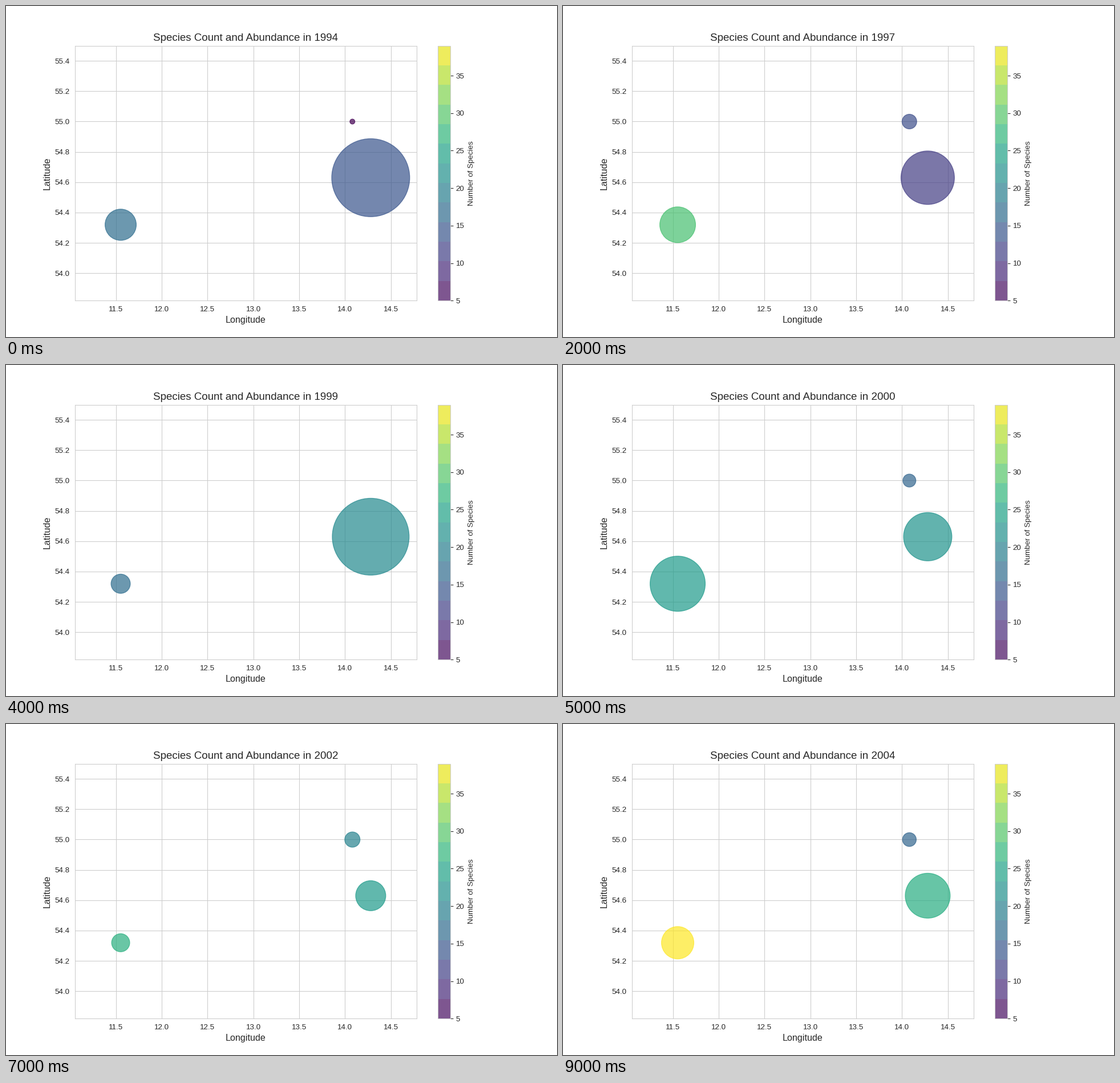
Animation of 966x580 px, one loop 10000 ms. Source, as a matplotlib script:

```python
import matplotlib.pyplot as plt
import numpy as np
from matplotlib.animation import FuncAnimation
from matplotlib.cm import ScalarMappable
from matplotlib.colors import Normalize

DPI = 96
K = 96.6 / DPI  # keeps point sizes in step with the stage width
INK, GREY = "0.15", "0.8"
ALPHA, EDGE = 0.7, 1.0 * K

plt.rcParams.update({
    "font.family": "Liberation Sans",
    "font.size": 10 * K,
    "axes.titlesize": 14 * K,
    "axes.titlepad": 6.5,
    "axes.labelsize": 12 * K,
    "axes.edgecolor": GREY,
    "axes.labelcolor": INK,
    "axes.linewidth": 0.8 * K,
    "axes.axisbelow": True,
    "text.color": INK,
    "xtick.color": INK,
    "ytick.color": INK,
})

YEARS = [1994, *range(1995, 2005)]
YEARS.remove(1996)  # no survey that year
SITES = np.array([(11.551, 54.3195), (14.081, 54.9995), (14.281, 54.6295)])

# Per site: circle radius in pixels for each year, 0 where nothing was caught
RADII = np.array([
    [28, 11, 32, 32, 17.5, 49, 32, 16.5, 17.5, 29],
    [5, 4.6, 13.5, 12, 0, 12, 11.5, 14, 17, 12.7],
    [69, 75, 47.5, 58, 68, 43, 29.7, 27, 45.5, 40],
])

# Species counts at key years; the years between are interpolated
KEYS = [1994, 1995, 1997, 1999, 2001, 2003, 2004]
COUNTS = np.array([np.interp(YEARS, KEYS, row) for row in (
    [17, 11, 29, 17, 30, 23, 39],
    [5, 5, 13, 15, 17, 23, 16],
    [14, 22, 11, 21, 24, 23, 26],
)])

fig, ax = plt.subplots(figsize=(966 / DPI, 580 / DPI), dpi=DPI)
norm = Normalize(5, 39)
bands = np.linspace(5, 39, 14)
bar = fig.colorbar(ScalarMappable(norm, "viridis"), ax=ax, alpha=ALPHA,
                   boundaries=bands, values=(bands[:-1] + bands[1:]) / 2,
                   spacing="proportional", ticks=range(5, 36, 5))
bar.minorticks_off()
bar.set_label("Number of Species", size=10 * K, labelpad=4.6)

low, high = SITES.min(axis=0) - 0.5, SITES.max(axis=0) + 0.5
ax.set(xlim=(low[0], high[0]), ylim=(low[1], high[1]),
       xlabel="Longitude", ylabel="Latitude",
       xticks=np.arange(11.5, 14.6, 0.5), yticks=np.arange(54, 55.5, 0.2))
ax.xaxis.set_major_formatter("{x:.1f}")
ax.yaxis.set_major_formatter("{x:.1f}")
ax.tick_params(left=False, bottom=False)
ax.grid(color=GREY, linewidth=0.8 * K)

title = ax.set_title("")
dots = ax.scatter([], [], c=[], cmap="viridis", norm=norm,
                  alpha=ALPHA, linewidths=EDGE)


def area(radius):
    """Marker area in square points for an outer radius in pixels."""
    return (2 * radius * 72 / DPI - EDGE) ** 2


def update(i):
    seen = RADII[:, i] > 0
    dots.set_offsets(SITES[seen])
    dots.set_sizes(area(RADII[seen, i]))
    dots.set_array(COUNTS[seen, i])
    title.set_text(f"Species Count and Abundance in {YEARS[i]}")
    return dots, title


anim = FuncAnimation(fig, update, frames=len(YEARS), interval=1000,
                     repeat=True, blit=False)
plt.show()
```
